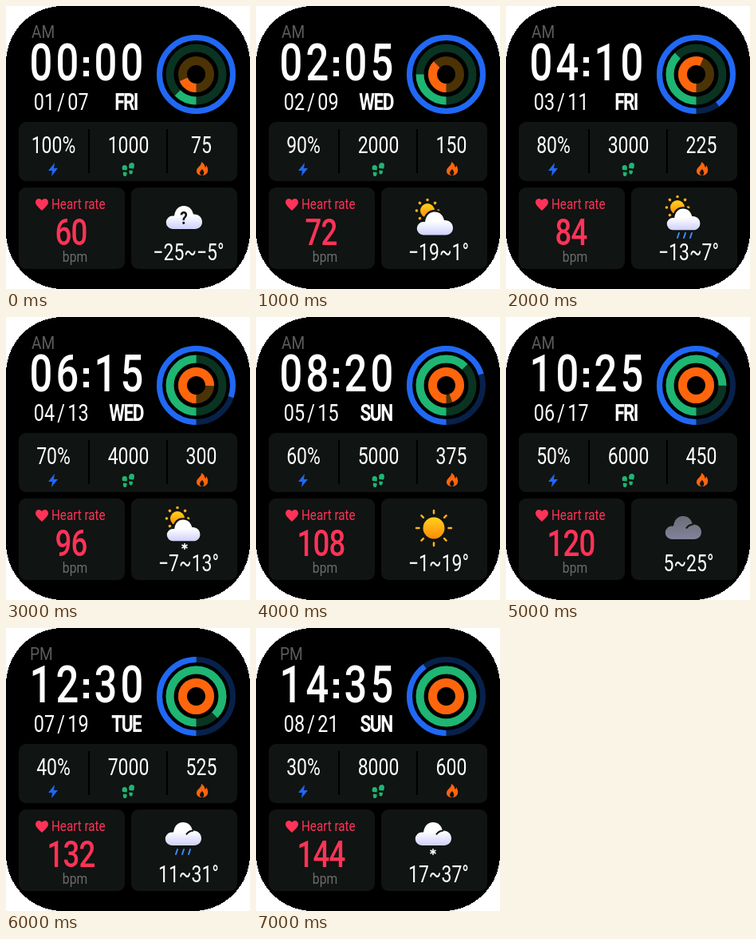
Recreate the animation shown at these times as an HTML page. Size 306 by 354 pixels, loop 8000 ms.

```html
<!DOCTYPE html>
<html lang="en">
<head>
<meta charset="utf-8">
<title>Watch face</title>
<style>
html, body { margin: 0; width: 100%; height: 100%; overflow: hidden; background: #fff; }
svg { display: block; width: 306px; height: 354px; }
/* Condensed face: one ratio for figures, one for labels */
text {
  font-family: Roboto, "Open Sans", sans-serif; fill: #fff;
  transform-box: fill-box; transform-origin: 0 50%; transform: scaleX(.87);
}
.mid { text-anchor: middle; transform-origin: 50% 50%; }
.time, .date, .day, .stat, .pulse { transform: scaleX(.78); }
.time { font-size: 65px; font-weight: 500; }
.date { font-size: 30px; }
.day { font-size: 29px; font-weight: 600; letter-spacing: -2px; }
.stat { font-size: 29.5px; }
.ampm { font-size: 22px; fill: #5c5c5c; }
.pulse { font-size: 47px; font-weight: 500; fill: #ff3358; letter-spacing: -1px; }
.label { font-size: 17.5px; fill: #ff3358; }
.unit { font-size: 18px; fill: #6c6c6c; }
.ask { font-size: 22px; font-weight: 700; fill: #101412; }
</style>
</head>
<body>
<svg viewBox="0 0 306 354">
  <defs>
    <linearGradient id="white" x1="0" y1="0" x2="0" y2="1">
      <stop offset=".4" stop-color="#fff"/><stop offset="1" stop-color="#cfd0fb"/>
    </linearGradient>
    <linearGradient id="gray" x1="0" y1="0" x2="0" y2="1">
      <stop offset="0" stop-color="#6c6c78"/><stop offset="1" stop-color="#82829a"/>
    </linearGradient>
    <linearGradient id="gold" x1="0" y1="0" x2="0" y2="1">
      <stop offset="0" stop-color="#ffd21c"/><stop offset="1" stop-color="#ff8a08"/>
    </linearGradient>
    <path id="cloud" d="M8 29a8 8 0 0 1 0-16.500h2C11 5 15 0 22 0c6 0 10.500 4 12 10.500 6-.5 11 3.500 11 9.500 0 5.500-4 9-9 9z"/>
    <path id="flake" d="M0-4V4M-3.500-2 3.500 2M-3.500 2 3.500-2" stroke="#fff" stroke-width="1.500"/>
    <path id="rain" d="M-7-3-9 3M1-3-1 3M9-3 7 3" stroke="#3d8bff" stroke-width="2" stroke-linecap="round"/>
  </defs>
  <rect width="306" height="354" rx="71" shape-rendering="crispEdges"/>
  <g fill="#101412">
    <rect x="16" y="145" width="274" height="74" rx="9"/>
    <rect x="16" y="227" width="133" height="102" rx="9"/>
    <rect x="157" y="227" width="133" height="102" rx="9"/>
  </g>
  <path d="M104 154V209M202 154V209" stroke="#000" stroke-width="2"/>
  <g id="rings" fill="none"></g>
  <text id="ampm" class="ampm" y="40"></text>
  <g id="digits"></g>
  <path d="M97 64h7v7h-7zM97 81h7v7h-7z" fill="#fff"/>
  <text id="month" class="date mid" x="48" y="130.500"></text>
  <text class="date mid" x="69" y="130.500">/</text>
  <text id="date" class="date mid" x="90.500" y="130.500"></text>
  <text id="day" class="day mid" x="150.500" y="130.500"></text>
  <text id="power" class="stat mid" x="59.500" y="184"></text>
  <text id="steps" class="stat mid" x="153.500" y="184"></text>
  <text id="burn" class="stat mid" x="245" y="184"></text>
  <path d="M61 196 53 206h5l-1 7 8-10h-5z" fill="#2068f5"/>
  <g fill="#1fb573">
    <path d="M146 205c-1-4 0-6 3-6s3.500 3 2.500 6.500zM147 207.500l4.500.5c.5 3-.5 5-2.500 5s-2.500-2.500-2-5.500z"/>
    <path d="M154.500 203c-1-4 0-7 3.500-7s3.500 4 2 7.500zM154.500 205.500l4.500.5c0 3-1 4.500-2.500 4.500s-2.500-2-2-5z"/>
  </g>
  <path d="M245 195c5 3 4 6 5 7 1-1 1-2 1-3 5 7 1 13-5 13-7 0-9-6-5-10 3-3 4-4 4-7z" fill="#ff650d"/>
  <path d="M246 204c3 3 3 7 0 8-4-1-4-5 0-8z" fill="#101412"/>
  <path d="M45 256C41 252 37 249 37 245.500c0-5 5.500-6 8-2.500 2.500-3.500 8-2.500 8 2.500 0 3.500-4 6.500-8 10.500z" fill="#ff3358"/>
  <text class="label" x="57" y="254">Heart rate</text>
  <text id="pulse" class="pulse mid" x="81.500" y="299.500"></text>
  <text class="unit mid" x="86.500" y="320">bpm</text>
  <g id="weather"></g>
  <text id="temp" class="stat mid" x="229" y="318.500"></text>
</svg>
<script>
const el = id => document.getElementById(id);
const put = (id, s) => { el(id).textContent = s; };
const two = n => String(n).padStart(2, "0");
const minus = n => n < 0 ? "\u2212" + -n : "" + n;
const days = ["FRI", "WED", "FRI", "WED", "SUN", "FRI", "TUE", "SUN"];

// Arc from the bottom, clockwise
function ring(r, w, dark, color, part) {
  const c = `<circle cx="238.500" cy="85.500" r="${r}" stroke-width="${w}"`;
  const len = 2 * Math.PI * r, p = Math.min(1, part);
  return `${c} stroke="${dark}"/>${c} stroke="${color}" stroke-dasharray="${len * p} ${p < 1 ? len : 0}" transform="rotate(90 238.500 85.500)"/>`;
}

const use = (id, x, y) => `<use href="#${id}" x="${x}" y="${y}"/>`;
const cloud = (x, y, fill = "white", k = 1) =>
  `<use href="#cloud" transform="translate(${x} ${y}) scale(${k})" fill="url(#${fill})"/>`;
const curlCloud = (y, fill) => cloud(200, y, fill) +
  `<path d="M235 ${y + 10.5}c-4 0-7 2-9 5" fill="none" stroke="#101412" stroke-width="2"/>`;

function sun(x, y, r, gap, len, w) {
  let rays = "";
  for (let a = 0; a < 360; a += 45)
    rays += `<path d="M0 ${-r - gap}v${-len}" transform="rotate(${a})"/>`;
  return `<g transform="translate(${x} ${y})" stroke="#ffb31a" stroke-width="${w}" stroke-linecap="round">
    <circle r="${r}" fill="url(#gold)" stroke="none"/>${rays}</g>`;
}

const sunCloud = (y, k) => sun(215, y, 9, 4.5, .1, 3.5) +
  `<g stroke="#101412" stroke-width="5">${cloud(202, y + 1.5, "white", k)}</g>` +
  cloud(202, y + 1.5, "white", k);

const weather = [
  () => cloud(201, 250) + `<text class="ask mid" x="223" y="273">?</text>`,
  () => sunCloud(256, 1),
  () => sunCloud(252, .92) + use("rain", 224, 287),
  () => sunCloud(252, .92) + use("flake", 224, 287),
  () => sun(223, 264, 13.5, 5, 3.5, 2.5),
  () => curlCloud(249, "gray"),
  () => curlCloud(243, "white") + use("rain", 222, 280),
  () => curlCloud(243, "white") + use("flake", 222, 280)
];

function draw(n) {
  const hour = n * 2;
  put("ampm", hour < 12 ? "AM" : "PM");
  el("ampm").setAttribute("x", hour < 12 ? 32 : 30);
  el("digits").innerHTML = [...two(hour) + two(n * 5)].map((d, i) =>
    `<text class="time mid" x="${[44, 77, 125, 158][i]}" y="93">${d}</text>`).join("");
  put("month", two(n + 1));
  put("date", two(7 + n * 2));
  put("day", days[n]);
  put("power", 100 - n * 10 + "%");
  put("steps", 1000 * (n + 1));
  put("burn", 75 * (n + 1));
  put("pulse", 60 + 12 * n);
  put("temp", minus(6 * n - 25) + "~" + minus(6 * n - 5) + "\u00b0");
  el("rings").innerHTML =
    ring(46, 7, "#08214a", "#2068f5", 1.1 - n / 10) +
    ring(33, 10, "#0a3322", "#1fb573", (n + 1) / 8) +
    ring(17, 11, "#4b3305", "#ff650d", 75 * (n + 1) / 400);
  el("weather").innerHTML = weather[n]();
}

let shown = -1;
const start = performance.now();
function tick(now) {
  const n = Math.floor(Math.max(0, now - start) % 8000 / 1000);
  if (n !== shown) draw(shown = n);
  requestAnimationFrame(tick);
}
tick(start);
</script>
</body>
</html>
```
